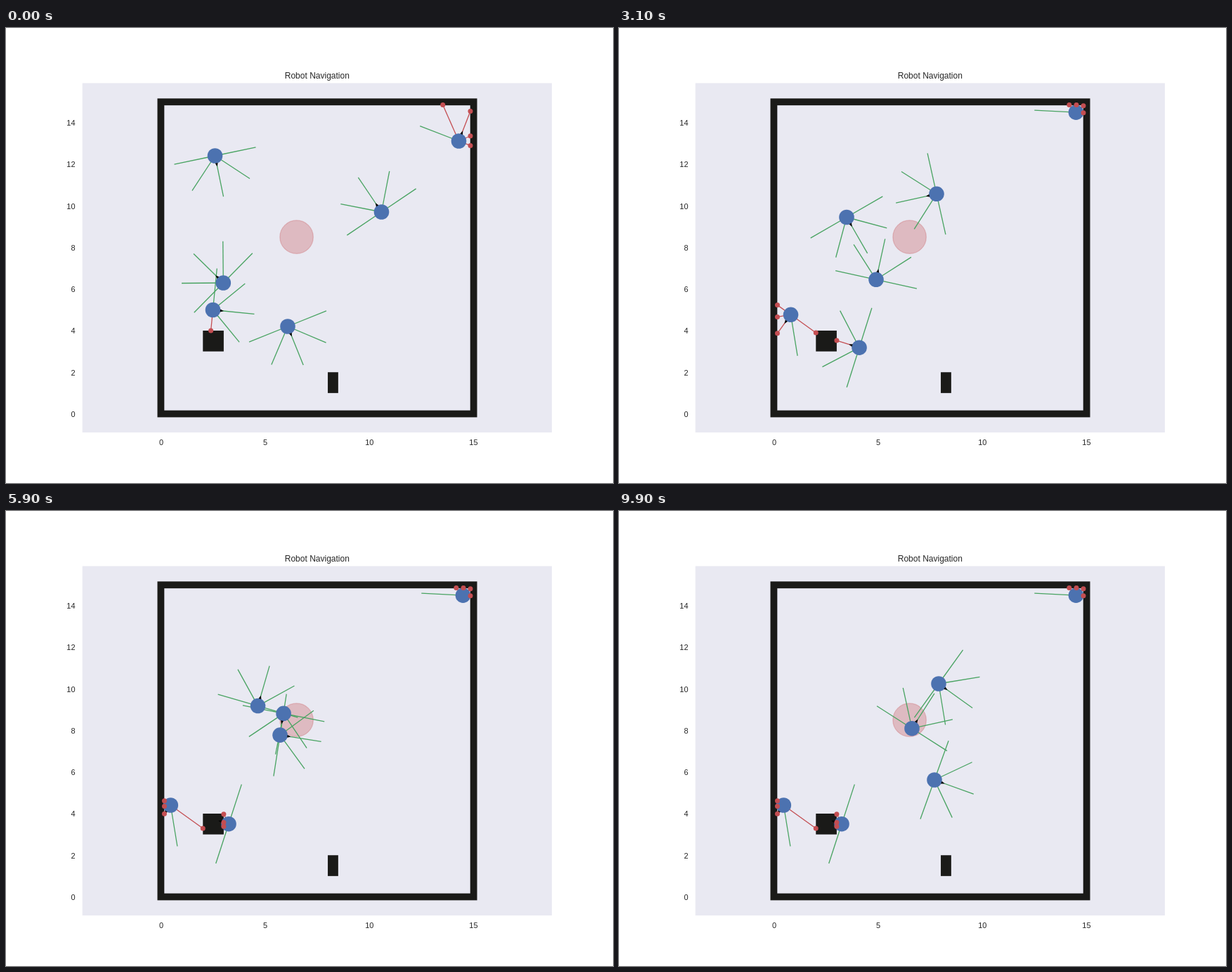
An HTML page with a canvas for the animation above (10000 ms loop, 864 by 648 pixels).

```html
<!DOCTYPE html>
<html lang="en">
<head>
<meta charset="utf-8">
<title>Robot Navigation</title>
<style>
html, body { margin: 0; width: 100%; height: 100%; overflow: hidden; background: #fff; }
canvas { display: block; }
</style>
</head>
<body>
<canvas id="stage" width="864" height="648"></canvas>
<script>
const ctx = document.getElementById('stage').getContext('2d');
const UNIT = 29.63, SPEED = UNIT / 10, RANGE = 2 * UNIT, RAD = Math.PI / 180;
const STEP_MS = 100, STEPS = 100;
const BLACK = '#1a1a18', BLUE = '#4c72b0', GREEN = '#48a361', RED = '#c44e52';

const px = x => 221 + UNIT * x;
const py = y => 549.5 - UNIT * y;

const room = [px(.15), py(14.85), px(14.85), py(.15)];
const boxes = [[2, 3, 3, 4], [8, 1, 8.5, 2]].map(([l, b, r, t]) => [px(l), py(t), px(r), py(b)]);

// Waypoints per robot: step, x, y, heading in degrees. Robots halt at the last one.
const robots = [
  [[0, 297.5, 182, 78.3], [19, 309.5, 237, 69.2], [31, 324, 269.5, 60],
   [47, 355, 304.5, 33], [70, 417, 309.7, -57.4]],
  [[0, 309.3, 363, -135.5], [19, 262.5, 378, 128.4], [31, 244.5, 408.3, 125.7], [36, 234.3, 419, 125.7]],
  [[0, 644.5, 161, -68.8], [14, 650.5, 120.2, -87]],
  [[0, 294.5, 401.5, 5.6], [19, 347.5, 388, -42], [31, 366, 358.3, -77.6], [47, 358.7, 312.7, -107],
   [71, 378, 249, -36], [87, 422, 234, 5.7], [99, 455, 246, 35.7]],
  [[0, 401, 425, 68], [19, 375.5, 465, -177.5], [31, 342, 455.2, -162.5], [40, 317, 445.7, -162]],
  [[0, 534.5, 262, -124], [19, 487.2, 235.5, -174.6], [31, 452, 236.3, 167.4], [47, 410, 257, 131.5],
   [71, 395, 324, 80.2], [87, 419, 364, 38.5], [99, 449, 383, 19.8]]
];

// Cubic Hermite between waypoints; the tangent gives the heading.
function pose(path, step) {
  let i = 0;
  while (i < path.length - 2 && step >= path[i + 1][0]) i++;
  const [t0, x0, y0, h0] = path[i], [t1, x1, y1, h1] = path[i + 1];
  const u = Math.min(1, (step - t0) / (t1 - t0)), v = 1 - u, k = SPEED * (t1 - t0);
  const at = (a, b, m, n) =>
    a * v * v * (1 + 2 * u) + b * u * u * (3 - 2 * u) + k * u * v * (m * v - n * u);
  const slope = (a, b, m, n) =>
    6 * u * v * (b - a) + k * (m * v * (1 - 3 * u) + n * u * (3 * u - 2));
  const ax = [x0, x1, Math.cos(h0 * RAD), Math.cos(h1 * RAD)];
  const ay = [y0, y1, Math.sin(h0 * RAD), Math.sin(h1 * RAD)];
  return { x: at(...ax), y: at(...ay), h: Math.atan2(slope(...ay), slope(...ax)) };
}

// Distances at which a ray enters and leaves a rectangle.
function span([l, t, r, b], x, y, dx, dy) {
  const xs = [(l - x) / dx, (r - x) / dx], ys = [(t - y) / dy, (b - y) / dy];
  return [Math.max(Math.min(...xs), Math.min(...ys)), Math.min(Math.max(...xs), Math.max(...ys))];
}

function sense({ x, y, h }) {
  return [-2, -1, 0, 1, 2].map(n => {
    const dx = Math.cos(h + n * Math.PI / 4), dy = Math.sin(h + n * Math.PI / 4);
    let d = Math.min(RANGE, span(room, x, y, dx, dy)[1]);
    for (const box of boxes) {
      const [enter, leave] = span(box, x, y, dx, dy);
      if (enter > 0 && enter < leave) d = Math.min(d, enter);
    }
    return { x, y, ex: x + dx * d, ey: y + dy * d, hit: d < RANGE };
  });
}

function rect(color, l, t, r, b) {
  ctx.fillStyle = color;
  ctx.fillRect(l, t, r - l, b - t);
}

function disc(color, x, y, r) {
  ctx.fillStyle = color;
  ctx.beginPath();
  ctx.arc(x, y, r, 0, 2 * Math.PI);
  ctx.fill();
}

function text(str, x, y, size, align) {
  ctx.font = size + 'px "Liberation Sans", Arial, sans-serif';
  ctx.textAlign = align;
  ctx.fillStyle = '#262626';
  ctx.fillText(str, x, y);
}

function drawScene() {
  rect('#fff', 0, 0, 864, 648);
  rect('#e9e9f2', 108.7, 78.5, 777, 576);
  text('Robot Navigation', 442.8, 72, 12, 'center');
  for (let v = 0; v <= 14; v += 2) text(v, 98.5, py(v) + 4.3, 11, 'right');
  for (let v = 0; v <= 15; v += 5) text(v, px(v), 594.3, 11, 'center');

  ctx.strokeStyle = BLACK;
  ctx.lineWidth = 9.8;
  ctx.strokeRect(px(0) - .6, py(15) + .2, 15 * UNIT + .8, 15 * UNIT - .2);
  boxes.forEach(b => rect(BLACK, ...b));

  const goal = 'rgba(196,78,82,.3)';
  disc(goal, px(6.5), py(8.5), .8 * UNIT);
  ctx.strokeStyle = goal;
  ctx.lineWidth = 1.2;
  ctx.stroke();
}

function drawArrow({ x, y, h }) {
  ctx.save();
  ctx.translate(x, y);
  ctx.rotate(h);
  ctx.fillStyle = '#000';
  ctx.beginPath();
  ctx.moveTo(10.5, -2);
  ctx.lineTo(15.5, 0);
  ctx.lineTo(10.5, 2);
  ctx.fill();
  ctx.restore();
}

function draw(step) {
  drawScene();
  const poses = robots.map(path => pose(path, step));
  const rays = poses.flatMap(sense);
  ctx.lineWidth = 1.3;
  for (const r of rays) {
    ctx.strokeStyle = r.hit ? RED : GREEN;
    ctx.beginPath();
    ctx.moveTo(r.x, r.y);
    ctx.lineTo(r.ex, r.ey);
    ctx.stroke();
  }
  poses.forEach(p => disc(BLUE, p.x, p.y, 10.8));
  poses.forEach(drawArrow);
  rays.filter(r => r.hit).forEach(r => disc(RED, r.ex, r.ey, 3.5));
}

const start = performance.now();
function tick() {
  draw(Math.floor((performance.now() - start) / STEP_MS) % STEPS);
  requestAnimationFrame(tick);
}
tick();
</script>
</body>
</html>
```
